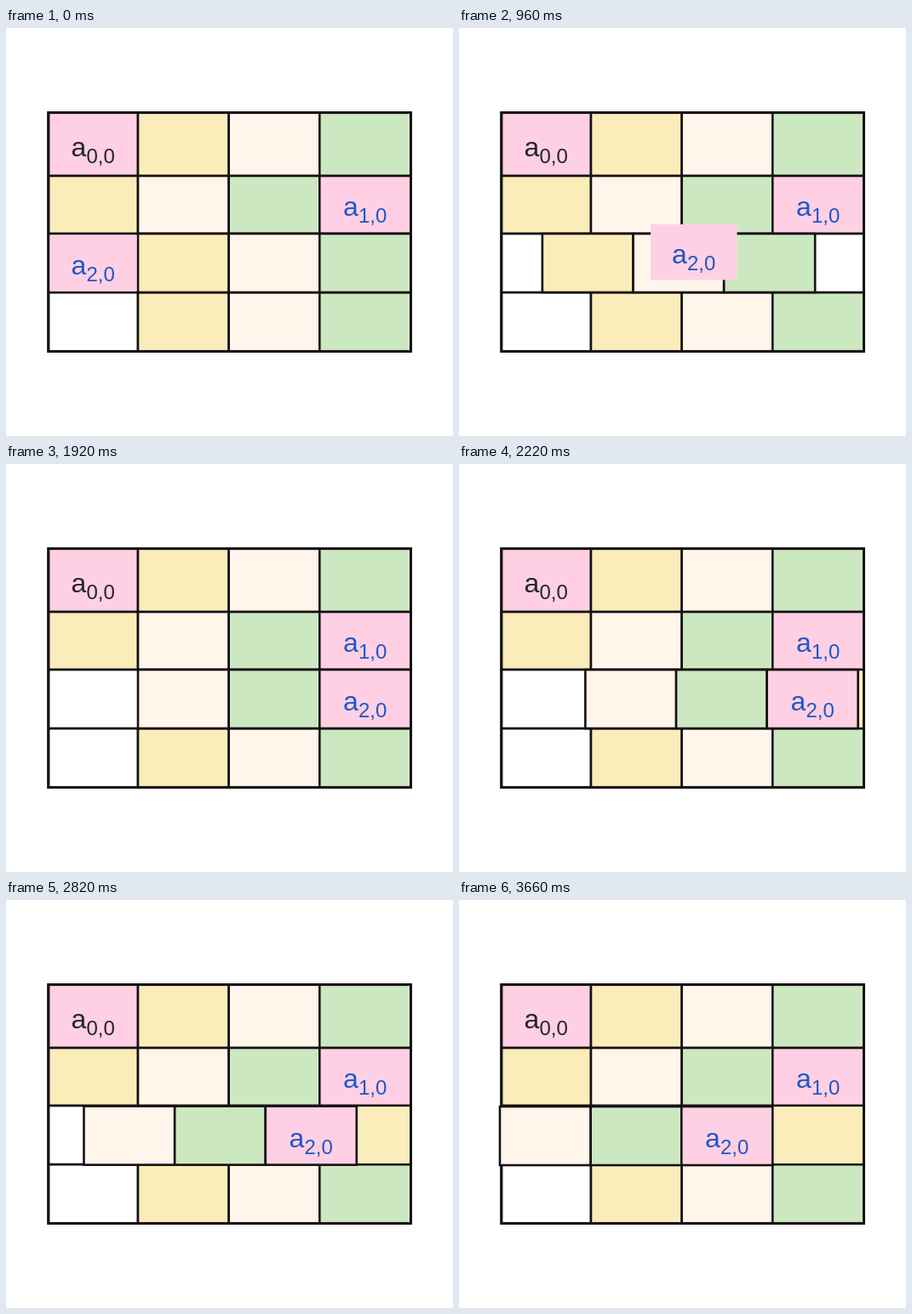
Recreate the animation shown at these times as an HTML page. Size 525x480 px, loop 3.72 s.

```html
<!DOCTYPE html>
<html lang="en">
<head>
<meta charset="utf-8">
<title>Row rotation</title>
<style>
  html, body { margin: 0; width: 100%; height: 100%; overflow: hidden; background: #fff; }
  svg { display: block; width: 525px; height: 480px; font-family: "Liberation Sans", Arial, sans-serif; }
</style>
</head>
<body>
<svg id="stage" viewBox="0 0 525 480"></svg>
<script>
const LOOP = 3720, STEP = 60, CUT = 1800, MOVE = 1500;
const START_A = 168, START_B = 1980;
const PINK = '#ffd0e4', YELLOW = '#faedb9', CREAM = '#fff5ea', GREEN = '#cce8c0', WHITE = '#fff';
const INK = '#161214', DARK = '#26262c', BLUE = '#1f57c9';
const X = [50, 155, 261.7, 368.3, 475.3];
const Y = [99.5, 174, 242, 311, 380.3];
const stage = document.getElementById('stage');

function add(parent, tag, attrs) {
  const el = document.createElementNS('http://www.w3.org/2000/svg', tag);
  for (const k in attrs) el.setAttribute(k, attrs[k]);
  parent.appendChild(el);
  return el;
}

const group = () => add(stage, 'g', {});

function box(parent, x, y, x2, y2, fill, line = 0) {
  return add(parent, 'rect', { x, y, width: x2 - x, height: y2 - y, fill, stroke: INK, 'stroke-width': line });
}

function label(parent, x, y, row, color) {
  const main = add(parent, 'text', { x, y, 'font-size': 32, fill: color });
  main.textContent = 'a';
  const sub = add(parent, 'text', { x: x + 18, y: y + 8, 'font-size': 24, fill: color });
  sub.textContent = row + ',0';
}

function cells(parent, row, from, fills) {
  fills.forEach((fill, i) =>
    box(parent, X[from + i], Y[row], X[from + i + 1], Y[row + 1], fill, 2.6));
}

// Fixed table; the third row is one open track.
const table = group();
cells(table, 0, 0, [PINK, YELLOW, CREAM, GREEN]);
cells(table, 1, 0, [YELLOW, CREAM, GREEN, PINK]);
cells(table, 3, 0, [WHITE, YELLOW, CREAM, GREEN]);
box(table, X[0], Y[2], X[4], Y[3], WHITE, 2.6);
label(table, 76.5, 150.5, 0, DARK);
label(table, 396, 221, 1, BLUE);
const spare = box(table, X[3], Y[2] + 1.3, 474, Y[3] - 1.3, YELLOW);
box(table, 49.7, 99.6, 475.5, 380.4, 'none', 3);

const trainA = group();
cells(trainA, 2, 1, [YELLOW, CREAM, GREEN]);

const patch = group();
box(patch, 51.6, 244.2, 153, 309.6, PINK);
label(patch, 76.5, 290, 2, BLUE);

const trainB = group();
cells(trainB, 2, 1, [CREAM, GREEN, PINK]);
label(trainB, 396, 290, 2, BLUE);

const show = (el, on) => el.setAttribute('visibility', on ? 'visible' : 'hidden');
const shift = (el, x, y) => el.setAttribute('transform', `translate(${x.toFixed(2)} ${y.toFixed(2)})`);

function ease(t, start) {
  const u = Math.min(1, Math.max(0, (t - start) / MOVE));
  return (1 - Math.cos(Math.PI * u)) / 2;
}

function draw(ms) {
  const t = Math.floor((ms % LOOP) / STEP) * STEP;
  const second = t >= CUT;
  show(trainA, !second);
  show(patch, !second);
  show(trainB, second);
  show(spare, second);
  const a = ease(t, START_A), b = ease(t, START_B);
  shift(trainA, -105 * a, 0);
  shift(patch, 319 * a, -13.3 * 4 * a * (1 - a));
  shift(trainB, -107 * b, b);
}

let origin = null;
function tick(now) {
  if (origin === null) origin = now;
  draw(now - origin);
  requestAnimationFrame(tick);
}
draw(0);
requestAnimationFrame(tick);
</script>
</body>
</html>
```
